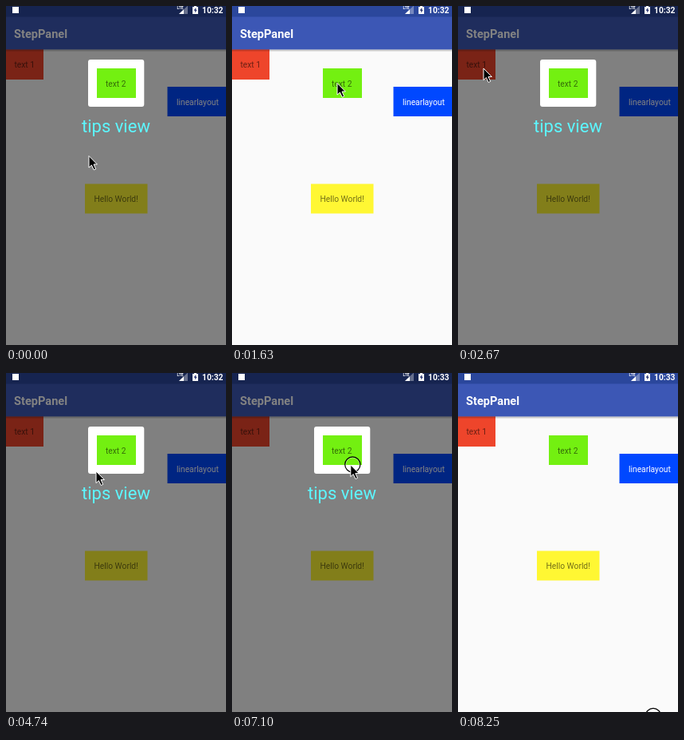
An HTML page that plays this animation: 276 px wide and 424 px high, repeating every 8.35 s.

```html
<!DOCTYPE html>
<html lang="en">
<head>
<meta charset="utf-8">
<title>Guide overlay</title>
<style>
  html, body { margin: 0; width: 100%; height: 100%; overflow: hidden; background: #fafafa; }
  svg { display: block; width: 276px; height: 424px; }
  text { font-family: Roboto, Inter, sans-serif; font-size: 10.25px; }
  .dark { fill: #000; fill-opacity: .55; }
  .light { fill: #fff; }
  .bold { font-weight: 700; }
</style>
</head>
<body>
<svg viewBox="0 0 276 424">
  <defs>
    <linearGradient id="shade" x1="0" y1="0" x2="0" y2="1">
      <stop offset="0" stop-color="#000" stop-opacity=".28"/>
      <stop offset="1" stop-color="#000" stop-opacity="0"/>
    </linearGradient>
  </defs>

  <rect width="276" height="424" fill="#fafafa"/>
  <rect y="54" width="47" height="38" fill="#ee452b"/>
  <rect x="202.5" y="101" width="73.5" height="37" fill="#0048ff"/>
  <rect x="99" y="222.5" width="78.5" height="37" fill="#fff733"/>
  <rect y="54.4" width="276" height="3.2" fill="url(#shade)"/>
  <rect y="13" width="276" height="41.4" fill="#3c57b5"/>
  <rect width="276" height="13.5" fill="#2b479c"/>

  <text class="dark" x="10.5" y="77">text 1</text>
  <text class="dark" x="110.5" y="245">Hello World!</text>
  <text class="light" x="214" y="123.5">linearlayout</text>
  <text class="light bold" x="10" y="40" style="font-size:14.6px">StepPanel</text>

  <g id="guide">
    <rect width="276" height="424" fill-opacity=".49"/>
    <rect x="103" y="67" width="70.3" height="59" rx="3" fill="#fff"/>
    <text x="95" y="158" fill="#5cf7ff" style="font-size:22px">tips view</text>
  </g>
  <rect x="114" y="78" width="49" height="37" fill="#73f011"/>
  <text class="dark" x="125" y="100.5">text 2</text>

  <rect class="light" x="8" y="1" width="8" height="8"/>
  <text class="light bold" x="214.5" y="4" style="font-size:5px">LTE</text>
  <path d="M217 10L228 -.5V10Z" fill="#fff" fill-opacity=".35"/>
  <path d="M217 10L223 4.3V10Z" fill="#fff"/>
  <path d="M234 1H236V0H239V1H241V10H234Z" fill="#fff"/>
  <path d="M238.3 2L235.5 5.8H237.2V8.5L239.7 4.7H238.3Z" fill="#26326f"/>
  <text id="clock" class="light bold" x="246" y="9"></text>

  <g id="ring" fill="none">
    <circle r="8.6" stroke="#fff" stroke-opacity=".5"/>
    <circle r="9.6" stroke="#000" stroke-width="1.2"/>
  </g>
  <path id="cursor" d="M0 0V14.6L3.4 11.5L6.2 17.5L8.7 16.4L6 10.5H10.4Z" fill="#000" stroke="#fff"/>
</svg>
<script>
const LOOP = 8350;
const STEP = 147; // the pointer is redrawn at this pace
const HOME = [104, 187.5];

// pointer moves: [first step, last step, x, y]
const moves = [
  [450, 740, 57, 200],
  [1040, 1480, 132, 96.5],
  [1920, 2370, 32, 78],
  [3270, 4150, 161, 226],
  [4450, 4740, 113, 123],
  [4880, 4880, 101, 123],
  [5030, 5320, 165, 250],
  [5620, 5910, 143, 150],
  [6060, 6500, 225, 118],
  [6800, 7100, 148.8, 115],
  [7540, 7980, 252, 442],
  [8250, 8250, 242.4, 429.5]
];
const presses = [[2370, 2670], [4880, 5030], [7100, 7240], [8250, LOOP]];
const closed = [[1630, 2670], [7240, LOOP]];

const el = id => document.getElementById(id);
const within = (spans, t) => spans.some(([a, b]) => t >= a && t < b);
const show = (id, on) => el(id).setAttribute('visibility', on ? 'visible' : 'hidden');
const place = (id, x, y) => el(id).setAttribute('transform', `translate(${x} ${y})`);
const ease = p => p * p * (3 - 2 * p);

function pointer(t) {
  let [x, y] = HOME;
  for (const [from, to, nx, ny] of moves) {
    if (t < from) break;
    const count = Math.round((to - from) / STEP) + 1;
    const done = t >= to ? count : Math.floor((t - from) / STEP) + 1;
    const p = ease(Math.min(1, done / count));
    x += (nx - x) * p;
    y += (ny - y) * p;
  }
  return [x, y];
}

function draw(t) {
  const [x, y] = pointer(t);
  place('cursor', x, y);
  place('ring', x + 2.5, y - .5);
  show('ring', within(presses, t));
  show('guide', !within(closed, t));
  el('clock').textContent = t < 6060 ? '10:32' : '10:33';
}

const start = performance.now();
function tick() {
  draw((performance.now() - start) % LOOP);
  requestAnimationFrame(tick);
}
tick();
</script>
</body>
</html>
```
